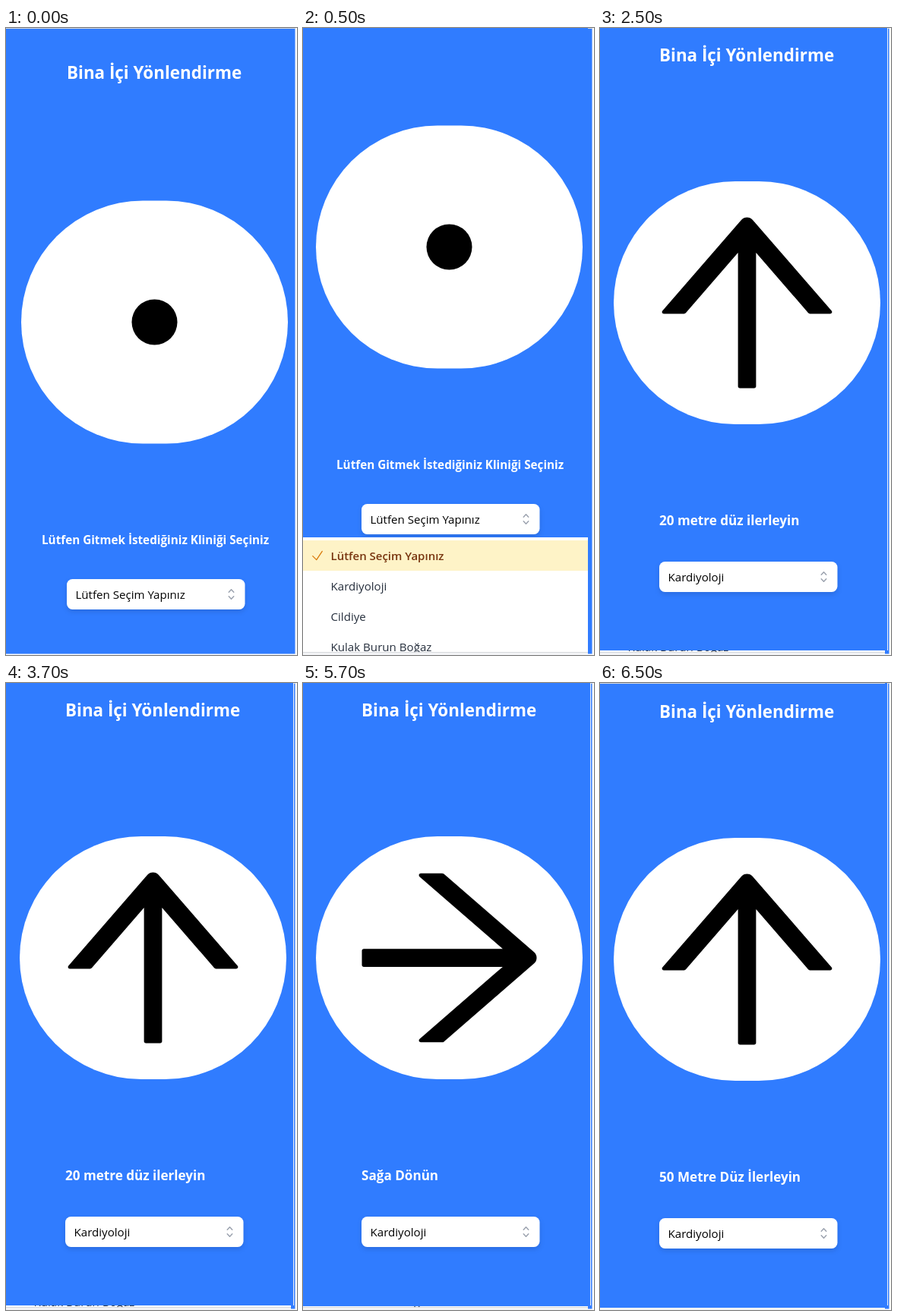
An HTML page that plays this animation: 383x826 px, repeating every 8 s.

```html
<!DOCTYPE html>
<html lang="tr">
<head>
<meta charset="utf-8">
<title>Bina İçi Yönlendirme</title>
<style>
  html, body { margin: 0; width: 100%; height: 100%; overflow: hidden; background: #fff; }
  svg { display: block; width: 100%; height: 100%; }
  text { font-family: "Open Sans", "Noto Sans", sans-serif; font-size: 15.1px; }
  .title { font-size: 22.4px; font-weight: 700; fill: #fff; }
  .step { font-size: 17.1px; font-weight: 700; fill: #fff; }
  .ask { font-size: 15.25px; font-weight: 700; fill: #fff; }
  .blue { fill: #307cff; }
  .line { fill: #d6d8dc; }
  .icon { fill: none; stroke-linecap: round; stroke-linejoin: round; stroke-width: 1.5; }
  .field { filter: drop-shadow(0 3px 3px rgba(0, 0, 0, .12)); }
  .options text { fill: #262f3d; }
  .options .chosen { font-size: 15px; font-weight: 600; fill: #78350f; }

  /* Hard cuts between the screens */
  .screen { opacity: 0; animation: 8s step-end infinite; }
  .start { animation-name: start; }
  .menu { animation-name: menu; }
  .options { animation-name: options; }
  .ahead { animation-name: ahead; }
  .right { animation-name: right; }
  .on { animation-name: on; }
  @keyframes start { 0% { opacity: 1 } 6.25%, 100% { opacity: 0 } }
  @keyframes menu { 0% { opacity: 0 } 6.25% { opacity: 1 } 31.25%, 100% { opacity: 0 } }
  @keyframes options { 0% { opacity: 0 } 6.25%, 100% { opacity: 1 } }
  @keyframes ahead { 0% { opacity: 0 } 31.25%, 100% { opacity: 1 } }
  @keyframes right { 0% { opacity: 0 } 56.25% { opacity: 1 } 81.25%, 100% { opacity: 0 } }
  @keyframes on { 0% { opacity: 0 } 81.25%, 100% { opacity: 1 } }
</style>
</head>
<body>
<svg viewBox="0 0 383 826" preserveAspectRatio="none">
  <defs>
    <!-- Every part is placed from the top left corner of the select field -->
    <text id="title" class="title" y="-659">Bina İçi Yönlendirme</text>
    <rect id="panel" x="-60" width="351" height="320" rx="160" fill="#fff"/>
    <g id="field">
      <rect class="field" width="234.5" height="40" rx="7.5" fill="#fff"/>
      <path class="icon" stroke="#9ca3af" transform="translate(206.5 10)"
        d="M6.75 7.25 10 3.75l3.25 3.5M6.75 12.75 10 16.25l3.25-3.5"/>
    </g>
    <g id="ask">
      <use href="#panel" y="-498.5"/>
      <circle cx="115.5" cy="-338.5" r="30"/>
      <text class="ask" x="-33" y="-46">Lütfen Gitmek İstediğiniz Kliniği Seçiniz</text>
      <use href="#field"/>
      <text x="11.5" y="26">Lütfen Seçim Yapınız</text>
    </g>
    <g id="route">
      <use href="#title"/>
      <use href="#panel" y="-501"/>
      <use href="#field"/>
      <text x="11.5" y="26">Kardiyoloji</text>
    </g>
    <path id="up" transform="translate(-44.5 -501) scale(.3125)"
      d="M868 545.5 536.1 163a32 32 0 0 0-48.3 0L156 545.5a8 8 0 0 0 6 13.2h81c4.6 0 9-2 12.1-5.5L474 300.9V864c0 4.4 3.6 8 8 8h60c4.4 0 8-3.6 8-8V300.9l218.9 252.3c3 3.5 7.4 5.5 12.1 5.5h81c6.8 0 10.5-8 6-13.2z"/>
    <path id="turn" transform="translate(-44.5 -501) scale(.3125)"
      d="M869 487.8 491.2 159.9c-2.9-2.5-6.6-3.9-10.5-3.9h-88.5c-7.4 0-10.8 9.2-5.2 14l350.2 304H152c-4.4 0-8 3.6-8 8v60c0 4.4 3.6 8 8 8h585.1L386.9 854c-5.6 4.9-2.2 14 5.2 14h91.5c1.9 0 3.8-.7 5.2-2L869 536.2a32 32 0 0 0 0-48.4z"/>
    <clipPath id="fold"><rect width="375" height="822"/></clipPath>
  </defs>

  <rect width="383" height="826" fill="#fafafa"/>
  <rect class="line" width="381" height="1"/>
  <rect class="blue" y="1" width="380.5" height="823.5"/>

  <g class="screen start" >
    <g transform="translate(80 726)">
      <use href="#title"/>
      <use href="#ask"/>
    </g>
  </g>

  <g class="screen menu">
    <rect class="blue" width="375" height="822"/>
    <use href="#ask" transform="translate(77 627)"/>
  </g>

  <g class="screen options">
    <rect y="671" width="375" height="155" fill="#fff"/>
    <rect y="675" width="375" height="40" fill="#fef3c7"/>
    <path class="icon" stroke="#d97706" transform="translate(9 685) scale(.8333)" d="m4.5 12.75 6 6 9-13.5"/>
    <g clip-path="url(#fold)">
      <text class="chosen" x="36.5" y="701">Lütfen Seçim Yapınız</text>
      <text x="36.5" y="741">Kardiyoloji</text>
      <text x="36.5" y="781">Cildiye</text>
      <text x="36.5" y="821">Kulak Burun Boğaz</text>
    </g>
    <rect class="line" y="822" width="375" height="1"/>
    <rect y="823" width="375" height="3" fill="#f3f4f6"/>
  </g>

  <g class="screen ahead">
    <rect class="blue" width="378" height="820"/>
    <rect x="378" width="1" height="820" fill="#f0f2f5"/>
    <g transform="translate(78 703)">
      <use href="#route"/>
      <use href="#up"/>
      <text class="step" y="-48">20 metre düz ilerleyin</text>
    </g>
  </g>

  <g class="screen right">
    <rect class="blue" width="375" height="821"/>
    <g transform="translate(77 703)">
      <rect class="blue" x="298" y="-703" width="3" height="820"/>
      <use href="#route"/>
      <use href="#turn"/>
      <text class="step" y="-48">Sağa Dönün</text>
    </g>
  </g>

  <g class="screen on">
    <rect class="blue" width="375" height="823"/>
    <rect class="line" width="375" height="1"/>
    <g transform="translate(78 705)">
      <use href="#route"/>
      <use href="#up"/>
      <text class="step" y="-48">50 Metre Düz İlerleyin</text>
    </g>
  </g>
</svg>
</body>
</html>
```
